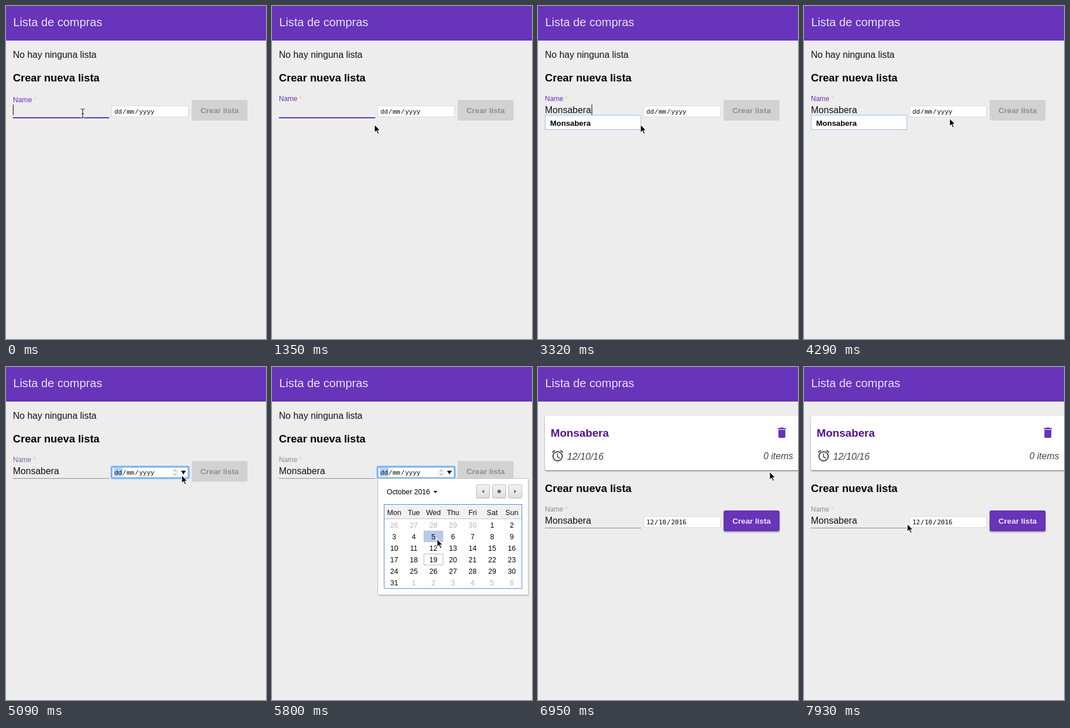
Recreate the animation shown at these times as an HTML page. Size 451 px wide and 578 px high, loop 8 s.

```html
<!DOCTYPE html>
<html lang="es">
<head>
<meta charset="utf-8">
<title>Lista de compras</title>
<style>
html, body { margin: 0; width: 100%; height: 100%; overflow: hidden; background: #ededed; }
svg { display: block; width: 451px; height: 578px; }
text { font-family: "Liberation Sans", Arial, sans-serif; white-space: pre; }
.bold { font-weight: bold; }
.italic { font-style: italic; }
.mono { font-family: "Liberation Mono", monospace; }
.digits { font-family: "DejaVu Sans Mono", monospace; }
.mid { text-anchor: middle; }
.end { text-anchor: end; }
</style>
</head>
<body>
<svg id="stage" viewBox="0 0 451 578" xmlns="http://www.w3.org/2000/svg"></svg>
<script>
const LOOP = 8000, STEP = 89;
const PURPLE = '#6734ba', GREY = '#8c8c8c';
const NAME = 'Monsabera';
const OPTIONS = [NAME, 'maem', 'marca', 'Mi lista guay'];
const KEY_TIMES = [2250, 2430, 2520, 2790, 2970, 3050, 3140, 3230, 3320];
const CARET_FLIPS = [450, 900, 1350, 1890, 2250, 3850, 4380];
const BLUR = 4920, OPEN = 5180, PICK = 5890, PRESS = 6860, ADD = 6950;

// start, steps, x, y: each move begins where the previous one ended
const MOVES = [
  [90, 5, 177, 204.5], [3940, 7, 300, 186.5], [4650, 1, 304, 186.5],
  [5360, 6, 284, 306], [5980, 4, 409.5, 154], [6330, 3, 401, 180.5],
  [7490, 6, 160.5, 278]
];

const stage = document.getElementById('stage');
const ruler = document.createElement('canvas').getContext('2d');
ruler.font = '16px "Liberation Sans", Arial, sans-serif';

const clamp = v => Math.max(0, Math.min(1, v));
const ease = v => v * v * (3 - 2 * v);
const count = (times, t) => times.filter(s => t >= s).length;

function mix(a, b, k) {
  const part = (c, i) => parseInt(c.slice(i, i + 2), 16);
  return `rgb(${[1, 3, 5].map(i => Math.round(part(a, i) + (part(b, i) - part(a, i)) * k))})`;
}

const text = (x, y, size, fill, str, cls = '') =>
  `<text x="${x}" y="${y}" font-size="${size}" fill="${fill}" class="${cls}">${str}</text>`;
const rect = (x, y, w, h, fill, more = '') =>
  `<rect x="${x}" y="${y}" width="${w}" height="${h}" fill="${fill}" ${more}/>`;
const path = (d, fill, more = '') => `<path d="${d}" fill="${fill}" ${more}/>`;
const line = (d, stroke, width = 1) => path(d, 'none', `stroke="${stroke}" stroke-width="${width}"`);

const DEFS = `<defs>
  <filter id="soft" x="-20%" y="-20%" width="140%" height="150%"><feGaussianBlur stdDeviation="1.2"/></filter>
  <linearGradient id="key" x2="0" y2="1"><stop stop-color="#f2f2f2"/><stop offset="1" stop-color="#dedede"/></linearGradient>
</defs>`;

function pointerAt(t) {
  let x = 133, y = 186;
  for (const [start, steps, toX, toY] of MOVES) {
    if (t < start) break;
    const done = Math.min(steps, Math.floor((t - start + 2) / STEP) + 1);
    const k = ease(done / steps);
    x += (toX - x) * k;
    y += (toY - y) * k;
  }
  return { x, y };
}

function pointer({ x, y }, beam) {
  if (beam) {
    const d = `M${x - 3.5} ${y - 7.5}q3.5 0 3.5 2.5v11q0 2.5-3.5 2.5m7 0q-3.5 0-3.5-2.5v-11q0-2.5 3.5-2.5m-5.5 8.5h4`;
    return line(d, '#fff', 2.4) + line(d, '#222', 1.2);
  }
  return path('M.8 1.2V15.4L4 12.4l2.5 5.4 2.4-1.1-2.4-5.1h4.4Z', '#000',
    `transform="translate(${x} ${y})" stroke="#fff" stroke-width="1.2"`);
}

function nameField(t) {
  const typed = NAME.slice(0, count(KEY_TIMES, t));
  const rise = clamp(t / 180);
  const fade = clamp((t - BLUR) / 300);
  const focused = t < BLUR;
  const labelY = 166.6 - 1.6 * rise;
  let out = text(12, labelY, 12.4 - 0.4 * rise, mix(PURPLE, GREY, fade), 'Name')
    + text(48 - 0.8 * rise, labelY, 12, '#f7cf46', '*')
    + (focused ? rect(12, 193, 167, 2, PURPLE) : rect(12, 193, 167, 1, GREY))
    + text(12, 186, 16, '#111', typed);
  const blinking = t < KEY_TIMES[0] || t > 3320;
  if (focused && (!blinking || count(CARET_FLIPS, t) % 2 === (t < 2250 ? 0 : 1))) {
    out += rect(Math.ceil(12 + ruler.measureText(typed).width), 171, 1, 18, '#000');
  }
  return out;
}

function suggestions(t) {
  const typed = NAME.slice(0, count(KEY_TIMES, t)).toLowerCase();
  if (!typed || t >= BLUR) return '';
  const hits = OPTIONS.filter(o => o.toLowerCase().startsWith(typed));
  return rect(12.5, 189.5, 166, 24 * hits.length + 1, '#fff', 'stroke="#9cc1e8"')
    + hits.map((o, i) => text(21, 207.5 + 24 * i, 13.33, '#000', o, 'bold')).join('');
}

function dateField(t, p) {
  const focused = t >= BLUR && t < PRESS;
  const hover = t < ADD && p.x > 183 && p.x < 317 && p.y > 173 && p.y < 193;
  const picked = t >= PICK;
  const parts = picked ? ['12', '10', '2016'] : ['dd', 'mm', 'yyyy'];
  const cls = picked ? 'digits' : 'mono';
  let out = rect(183.5, 173.5, 133, 19, '#fff', 'stroke="#dadada"');
  if (focused) {
    out += rect(183, 173, 134, 20, 'none', 'rx="2" stroke="#a9d0fa" stroke-width="4"')
      + rect(183.5, 173.5, 133, 19, '#fff', 'rx="1" stroke="#62a8f2" stroke-width="2"')
      + rect(187, 175, 15, 15, '#b0d3fc');
  }
  out += [188, 209.2, 231].map((x, i) => text(x, 186.5, 11, '#000', parts[i], cls)).join('')
    + [202, 223.5].map(x => text(x, 186.5, 11, '#000', '/', cls)).join('');
  if (focused || hover) {
    out += rect(289.5, 176.5, 8, 13, '#fff', 'rx="3" stroke="#d8d8d8"')
      + line('M291.5 181l2-2.2 2 2.2M291.5 185l2 2.2 2-2.2', '#555')
      + path('M303.5 180h8.5l-4.25 6.5Z', '#111');
  }
  return out;
}

function button(t) {
  const k = clamp((t - PICK) / 280);
  const drop = t >= PRESS && t < ADD ? 3 : 1.5;
  return (k ? rect(322, 163 + drop, 97, 36, '#000', `rx="3" opacity="${0.42 * k}" filter="url(#soft)"`) : '')
    + rect(322, 163, 97, 36, mix('#d2d2d2', PURPLE, k), 'rx="3"')
    + text(370.5, 186, 13.6, mix('#8f8f8f', '#eee8f8', k), 'Crear lista', 'bold mid');
}

function calendar(t, p) {
  if (t < OPEN || t >= PICK) return '';
  const colX = c => 212 + 34 * c;
  let out = rect(184, 195, 261, 202, '#000', 'opacity=".2" filter="url(#soft)"')
    + rect(183.5, 193.5, 261, 202, '#fff', 'rx="1" stroke="#bdbdbd"')
    + text(199, 221, 12.4, '#000', 'October 2016')
    + path('M280 215h7l-3.5 4Z', '#111')
    + [354, 382, 410].map(x => rect(x + 0.5, 204.5, 23, 23, 'url(#key)', 'rx="1" stroke="#b8b8b8"')).join('')
    + path('M368 213v6l-4-3ZM420 213v6l4-3Z', '#666')
    + '<circle cx="394" cy="216" r="3" fill="#666"/>'
    + rect(194, 238, 240, 26, '#f1f1f1')
    + rect(195, 263, 238, 1, '#c4c4c4');
  'Mon Tue Wed Thu Fri Sat Sun'.split(' ').forEach((d, c) => {
    out += text(colX(c), 256.5, 12.6, '#111', d, 'mid');
  });
  const col = Math.floor((p.x - 195) / 34), row = Math.floor((p.y - 264) / 20);
  if (row >= 0 && row < 6 && col >= 0 && col < 7) {
    out += rect(195 + 34 * col, 264 + 20 * row, 34, 20, '#b9c9ea');
  }
  out += rect(263.5, 324.5, 33, 19, 'none', 'stroke="#b9b9b9"');
  for (let i = 0; i < 42; i++) {
    const day = i - 4;
    const inside = day > 0 && day <= 31;
    const label = day <= 0 ? day + 30 : inside ? day : day - 31;
    out += text(colX(i % 7), 278.5 + 20 * Math.floor(i / 7), 12.4, inside ? '#000' : '#b5b5b5', label, 'mid');
  }
  return out + rect(194.5, 238.5, 239, 146, 'none', 'stroke="#4a90e2"');
}

function card() {
  const clock = '<g transform="translate(22 142)" fill="none" stroke="#444" stroke-width="2">'
    + '<circle cx="12" cy="13" r="8"/><path d="M2.6 6.5l4.6-3.9M21.4 6.5l-4.6-3.9"/>'
    + '<path d="M11.75 8v5.7l4.4 2.6" stroke-width="1.5"/></g>';
  const bin = path('M6 19c0 1.1.9 2 2 2h8c1.1 0 2-.9 2-2V7H6zM19 4h-3.5l-1-1h-5l-1 1H5v2h14z',
    PURPLE, 'transform="translate(411 102)"');
  return rect(12, 86.5, 460, 94, '#000', 'rx="2" opacity=".45" filter="url(#soft)"')
    + rect(12, 85, 460, 94, '#fff', 'rx="2"')
    + text(22, 121, 19.1, '#50148f', NAME, 'bold')
    + bin + clock
    + text(50.5, 161, 16.3, '#444', '12/10/16', 'italic')
    + text(442.5, 160, 16, '#444', '0 items', 'italic end');
}

function scene(t) {
  const p = pointerAt(t);
  const added = t >= ADD;
  const beam = t < BLUR && p.x < 179 && p.y < 193;
  return DEFS + rect(0, 0, 451, 578, '#ededed')
    + rect(0, 0, 451, 60, PURPLE)
    + text(12.5, 35, 20.3, '#e9e1f6', 'Lista de compras')
    + (added ? card() : text(12, 90, 16, '#111', 'No hay ninguna lista'))
    + `<g transform="translate(0 ${added ? 86 : 0})">`
    + text(12, 131, 18.65, '#000', 'Crear nueva lista', 'bold')
    + nameField(t) + dateField(t, p) + button(t) + '</g>'
    + suggestions(t) + calendar(t, p) + pointer(p, beam);
}

let shown = '';
function draw(now) {
  const next = scene(now % LOOP);
  if (next !== shown) stage.innerHTML = shown = next;
}

const begin = performance.now();
function tick() {
  draw(performance.now() - begin);
  requestAnimationFrame(tick);
}
tick();
</script>
</body>
</html>
```
